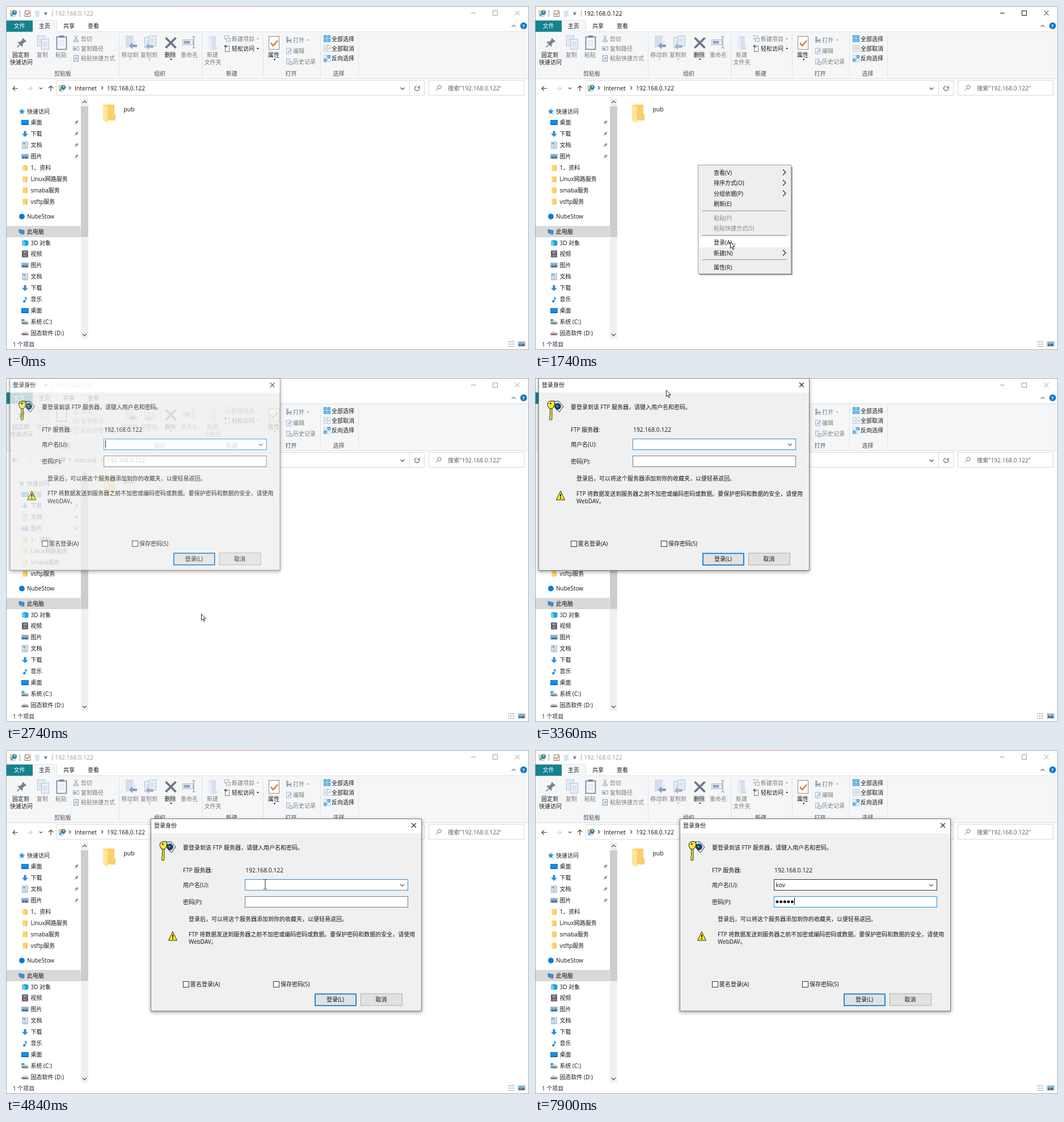
Write an HTML page that moves like this. It is 922 px wide and 607 px high and loops after 8000 ms.

```html
<!DOCTYPE html>
<html lang="zh-CN">
<head>
<meta charset="utf-8">
<title>FTP 登录</title>
<style>
html, body { margin: 0; width: 100%; height: 100%; overflow: hidden; background: #fff; }
svg { display: block; width: 100vw; height: 100vh; }
text { font-family: "Open Sans", "Noto Sans CJK SC", "Noto Sans CJK", "Noto Sans SC", sans-serif; white-space: pre; }
#dialog { filter: drop-shadow(0 2px 3px rgba(0,0,0,.4)); }
#ime { filter: drop-shadow(0 1px 2px rgba(0,0,0,.25)); }
</style>
</head>
<body>
<svg id="stage" viewBox="0 0 922 607" xmlns="http://www.w3.org/2000/svg"></svg>
<script>
const INK = '#161616', DIM = '#7d7d7d', BLUE = '#0a7ad6', GREY = '#9aa3ad';
const USER = 'kov';

// ---- drawing helpers: y of text is its visual middle ----
const text = (x, y, s, fill = INK, size = 10, more = '') =>
  `<text x="${x}" y="${y + 3.8}" font-size="${size}" fill="${fill}" ${more}>${s}</text>`;
const rect = (x, y, w, h, fill, stroke = 'none', sw = 1, more = '') =>
  `<rect x="${x}" y="${y}" width="${w}" height="${h}" fill="${fill}" stroke="${stroke}" stroke-width="${sw}" ${more}/>`;
const path = (d, fill = 'none', stroke = 'none', sw = 1, more = '') =>
  `<path d="${d}" fill="${fill}" stroke="${stroke}" stroke-width="${sw}" ${more}/>`;
const line = (d, stroke, sw = 1, more = '') => path(d, 'none', stroke, sw, more);
const disc = (x, y, r, fill, stroke = 'none', sw = 1) =>
  `<circle cx="${x}" cy="${y}" r="${r}" fill="${fill}" stroke="${stroke}" stroke-width="${sw}"/>`;
const at = (x, y, s, more = '') => `<g transform="translate(${x} ${y})${more}">${s}</g>`;
const group = (id, s) => `<g id="${id}">${s}</g>`;
const drop = (x, y, c) => path(`M${x - 2} ${y - 1}h4l-2 2.4z`, c);
const chevron = (x, y, dx, dy, c = '#444') =>
  line(dx ? `M${x} ${y - 3}l${dx} 3l${-dx} 3` : `M${x - 3.5} ${y}l3.5 ${dy}l3.5 ${-dy}`, c, 1.1);

// ---- icons, centred on 0,0 ----
const page = (w, h, fill, ink) =>
  rect(-w / 2, -h / 2, w, h, fill, ink) +
  [-.2, .05, .3].map(k => line(`M${-w * .3} ${h * k}h${w * .6}`, ink)).join('');
const pin = c => path('M-3-6H3V-4.5L2-4V-.5L4 1.5V2.5H-4V1.5L-2-.5V-4L-3-4.5Z', c) + line('M0 2V7.5', c, 1.2);
const drive = rect(-6, 0, 12, 4, '#777', 'none', 1, 'rx="1.5"') + path('M-6 1l2-3h8l2 3z', '#c9c9c9') + rect(2.5, 1.5, 2, 1, '#8fe08f');
const site = rect(-6, -4.5, 8, 6, '#f5d46c', '#c9ab55', .6) + rect(-5, 1, 8, 5, '#e6eaee', '#9ba5ad', .6) +
  disc(2, -1, 4.2, '#2d7fbd') + path('M0-3q2.5-2 4 .5l-1.5 2.5z', '#b5d98a') + path('M-5 2h4v3h-4z', '#4a8fcf');
const icons = {
  star: path('M0-5.5L1.5-1.8L5.5-1.5L2.4 1.1L3.4 5L0 2.9L-3.4 5L-2.4 1.1L-5.5-1.5L-1.5-1.8Z', '#2b93e0'),
  desk: rect(-6, -4, 12, 8, '#0f8ff0', '#0b62b0', .8) + line('M-5.6 3.5H5.6', '#0a4f90'),
  down: path('M-2-5h4v5h3.5l-5.5 5.5l-5.5-5.5h3.5z', '#2f8be0'),
  doc: page(9, 11, '#f3f7fa', '#7f97a8') + rect(-3, -4, 3, 2, '#3d8fcf'),
  pic: rect(-6, -4, 12, 8, '#eef3f6', '#8495a2', .8) + rect(-5, -3, 10, 3, '#5aa3dd') + path('M-5 3V0l4 1l6-1v3z', '#28506f'),
  dir: rect(-4, -5, 8, 10.5, '#ffd66e') + rect(2, -4, 2, 9, '#f2bd4a'),
  cloud: disc(0, 0, 5, BLUE),
  pc: path('M-5-4l9 2v6l-9-2z', '#2d93e3', '#53697a', .7) + line('M-3 4l7 1', '#89959e', 1.4),
  cube: path('M-5.5-3.5L0-5L6-3.5V4L0 5.5L-5.5 4Z', '#1ba0d8') + path('M-5.5-3.5L0-2V5.5L-5.5 4Z', '#67cdf2'),
  film: rect(-5.5, -6, 11, 12, '#3b4450') + rect(-3, -5, 6, 4.5, '#7b9dc4') + rect(-3, .5, 6, 4.5, '#b07a5c') +
    line('M-4.4-5v11M4.4-5v11', '#ddd', .9, 'stroke-dasharray="1.2 1.2"'),
  note: path('M0 3.5V-5Q1-3 3.5-2Q4 0 2.8 1.2Q3-.8 1.2-1.5V3.5', '#1c86dd') + disc(-1.3, 3.6, 2.2, '#1c86dd'),
  sys: rect(-6, -5, 5, 5, '#18a0e8') + drive,
  disk: drive
};

// ---- explorer window ----
const bigPage = (x, y) => rect(x, y, 13, 18, '#e6edf7', '#b4c3da') + line(`M${x + 3} ${y + 6}h7m-7 3h7m-7 3h7`, '#c3d0e2');
const tiles = (y, lit) => [0, 1, 2, 3].map(i => {
  const on = lit.includes(i);
  return rect(560.5 + i % 2 * 6.5, y - 5.5 + (i >> 1) * 6.5, 4.5, 4.5, on ? '#6fc4f5' : '#fff', on ? '#2e8fd0' : '#b3bcc5', .9);
}).join('');

function titleBar() {
  return at(13, 12.5, site) + line('M24.5 7v12', '#999') +
    rect(33.5, 8.5, 9, 10, '#fff', '#777') + line('M35 13l2.5 3l4-5', '#c8652a', 1.4) +
    rect(51, 8, 8, 11, '#d9e2ef') + line('M67.5 11.8h5', INK) + drop(70, 14.5, INK) + line('M81.5 7v12', '#aaa') +
    text(86, 12.7, '192.168.0.122', 'currentColor', 10.4) +
    line('M820 12.5h8M858.5 8.5h8v8h-8zM897.5 8.5l8 8m0-8l-8 8', 'currentColor');
}

function ribbon() {
  let s = rect(0, 46, 922, 82, '#f5f6f7') + line('M0 45.5H47M89 45.5H922M0 128.5H922', '#dcdddf') +
    rect(0, 25.5, 47, 20, '#17828f') + path('M47.5 46V25.5H89.5V46', '#f5f6f7', '#dfe0e2') +
    text(13.5, 35, '文件', '#fff') + text(58, 35, '主页') + text(101, 35, '共享') + text(144, 35, '查看') +
    chevron(895, 37, 0, -3.5, '#777') + disc(912.5, 35, 6, '#1277c8') + text(910, 35, '?', '#fff', 9, 'font-weight="700"');
  for (const x of [199.5, 345.5, 453.5, 554.5, 621.5]) s += line(`M${x} 49V126`, '#e1e2e4');
  const labels = [
    [119.5, '剪贴板 组织 新建 打开 选择', [85, 261, 388, 492.5, 576.5], '#4c4c4c'],
    [86.5, '固定到 删除 属性', [11, 279.5, 462], INK],
    [99.5, '快速访问', [7], INK],
    [86.5, '复制 粘贴 移动到 复制到 重命名 新建', [54, 87, 203.5, 237, 308, 354], DIM],
    [99.5, '文件夹', [349.5], DIM],
    [58, '剪切 新建项目', [132, 398], DIM],
    [75, '复制路径', [132], DIM],
    [92.5, '粘贴快捷方式', [132], DIM],
    [60, '打开', [506], DIM], [79, '编辑', [506], DIM], [98.5, '历史记录', [506], DIM],
    [75, '轻松访问 全部取消', [398, 574], INK],
    [58, '全部选择', [574], INK], [92.5, '反向选择', [574], INK]
  ];
  for (const [y, words, xs, c] of labels) words.split(' ').forEach((w, i) => s += text(xs[i], y, w, c));
  s += at(27, 65.5, pin('#78828c'), ' rotate(45) scale(1.4)');
  s += bigPage(55.5, 52.5) + bigPage(62.5, 58.5);
  s += rect(89.5, 54.5, 17, 22, '#f3f7fd', '#6d7f99', 1.6) + rect(94, 52, 8, 4, '#7c8aa0') + line('M93 61h10m-10 4h10m-10 4h10', '#c5d5ea');
  s += line('M120.5 52l5 8m1-8l-5 8', GREY, 1.2) + disc(121, 62, 1.8, 'none', GREY) + disc(126, 62, 1.8, 'none', GREY);
  s += rect(118.5, 72, 10, 6, '#eef2f7', '#8fa3bd') + line('M120 74l1 3l1-3l1 3l1-3', '#6d88a9', .8);
  s += rect(119.5, 87.5, 8, 10, '#eef2f7', '#8295ad') + line('M122 95l3-4m0 0h-2.5m2.5 0v2.5', '#5b82b5', .9);
  s += rect(211, 52, 14, 21, '#d4deee') + rect(222, 60, 6, 13, '#e3eaf5') + path('M217 70l6-6v4h8v4.5h-8v4z', '#8d9fbd');
  s += bigPage(244.5, 55.5) + bigPage(251.5, 52.5) + path('M246 71l6-6v4h8v4.5h-8v4z', '#a3b2cb');
  s += line('M281.5 56l18 18m0-18l-18 18', '#6a7688', 3.8);
  s += rect(311.5, 59.5, 18, 9, '#eef2f8', '#a9b7cb') + rect(313.5, 61.5, 11, 5, '#8da4c8') +
    line('M328 54h6m-3 0v20m-3 0h6', '#8b9ab0', 1.2);
  s += path('M357 53h13v18l2 1v5h-8l-7-4z', '#d5dfee') + path('M357 53l6 4v20l-6-4z', '#e5ecf6');
  s += rect(385.5, 52.5, 7, 6, '#f5f8fc', '#9fb0c6') + rect(388.5, 56.5, 7, 6, '#e6edf7', '#9fb0c6');
  s += rect(386.5, 70.5, 7, 10, '#fff', '#777') + line('M390 73l-5-2m0 0l3-2', '#333', 1.3);
  s += rect(463.5, 53.5, 18, 23, '#fff', '#8a8a8a') + line('M467 65l4 5l8-9', '#d97b2e', 2.6);
  s += rect(494, 54, 4, 11, '#aab7c8') + rect(500, 58, 4, 7, '#b9c8dc') + line('M496 61h6', '#7186a6', 1.5);
  s += rect(494.5, 74.5, 8, 10, '#f0f4fa', '#a6b7cd') + line('M497 82l6-6', '#8aa5cd', 1.6);
  s += rect(494.5, 93.5, 6, 9, '#e8edf4', '#a6b3c4') + disc(502, 101, 3, '#dfe6ef', '#8f9db0');
  s += tiles(57.5, [0, 1, 2, 3]) + tiles(75, []) + tiles(92.5, [1, 2]);
  for (const [x, y, c] of [[219, 94, '#aaa'], [252.5, 94, '#aaa'], [291, 94, INK], [473.5, 94.5, INK], [444, 58, '#999'], [444, 75, INK], [532.5, 60, '#999']])
    s += drop(x, y, c);
  return s;
}

function addressBar() {
  return line('M21 145.5H12m4-4l-4 4l4 4', '#444', 1.2) + line('M37 145.5h9m-4-4l4 4l-4 4', '#ccc', 1.2) +
    line('M59 144l2.5 2.5l2.5-2.5', '#555', 1.2) + line('M79 150v-9m-4 4l4-4l4 4', '#444', 1.2) +
    rect(89.5, 131.5, 648, 26, '#fff', '#d9d9d9') + line('M711.5 132v25', '#d9d9d9') +
    at(99, 144.5, site) + chevron(111, 144.5, 3, 0) + text(121, 144.7, 'Internet', INK, 10.4) +
    chevron(168, 144.5, 3, 0) + text(178, 144.7, '192.168.0.122', INK, 10.3) + chevron(699, 144, 0, 3.5) +
    line('M728.3 143.6A4.1 4.1 0 1 1 724.5 141.2M728.6 140.4v3.2h-3.2', '#555', 1.1) +
    rect(745.5, 131.5, 168, 26, '#fff', '#d9d9d9') + disc(764, 143, 3.2, 'none', '#777') +
    line('M761.7 145.3l-4 4', '#777') + text(779, 144.7, '搜索"192.168.0.122"', '#5f5f5f', 10.2);
}

function sidebar() {
  const rows = [
    ['star', '快速访问', 186, 0], ['desk', '桌面', 205.5, 2], ['down', '下载', 225.5, 2], ['doc', '文档', 245.5, 2],
    ['pic', '图片', 265.5, 2], ['dir', '1、资料', 285.5, 1], ['dir', 'Linux网路服务', 305.5, 1], ['dir', 'smaba服务', 325, 1],
    ['dir', 'vsftp服务', 345, 1], ['cloud', 'NubeStow', 371.5, 0], ['pc', '此电脑', 398, 0], ['cube', '3D 对象', 418, 1],
    ['film', '视频', 437.5, 1], ['pic', '图片', 457.5, 1], ['doc', '文档', 477.5, 1], ['down', '下载', 497.5, 1],
    ['note', '音乐', 517.5, 1], ['desk', '桌面', 537.5, 1], ['sys', '系统 (C:)', 557.5, 1], ['disk', '固态软件 (D:)', 577, 1]
  ];
  let s = rect(0, 388, 131.5, 20, '#d9d9d9');
  for (const [icon, name, y, level] of rows) {
    s += at(level ? 33.5 : 28, y, icons[icon]) + text(level ? 43.5 : 37, y, name);
    if (level === 2) s += at(124, y, pin('#858c94'), ' rotate(45) scale(.62)');
  }
  return s + rect(132, 163, 13, 424, '#f0f0f0') + rect(132, 177, 13, 230.5, '#cdcdcd') +
    chevron(138.5, 171, 0, -3.5) + chevron(138.5, 578.5, 0, 3.5);
}

function explorer() {
  return rect(0, 0, 922, 607, '#fff') + group('title', titleBar()) + ribbon() + addressBar() + sidebar() +
    path('M173 174H191V190l2 1.5V202H173Z', '#f8cf6b') + path('M171 173.5l8.5 3.5V207l-8.5-5z', '#ffe49a') +
    text(207.5, 182, 'pub', INK, 10.4) + text(12, 597, '1 个项目', '#223') +
    [592.5, 596.5, 600.5].map(y => line(`M885 ${y}h2m1 0h3.5m1 0h3.5`, '#8a8a8a')).join('') + at(909, 596.5, icons.pic) +
    rect(.5, .5, 921, 606, 'none', '#a8a8a8') +
    group('edge', line('M310 .5h70M392 .5h52', '#d98a84'));
}

// ---- context menu ----
const ITEMS = [['查看(V)', 294, 1], ['排序方式(O)', 312.5, 1], ['分组依据(P)', 331, 1], ['刷新(E)', 349.5],
  ['粘贴(P)', 374, 0, 1], ['粘贴快捷方式(S)', 392.5, 0, 1], ['登录(A)...', 417], ['新建(N)', 436, 1], ['属性(R)', 461]];

function menu() {
  return rect(290, 284, 164, 191, '#000', 'none', 1, 'opacity=".38"') + rect(287.5, 280.5, 164, 192, '#eee', '#a2a2a2') +
    rect(290, 0, 159, 18.5, '#fff', 'none', 1, 'id="hover"') +
    [361.5, 404.5, 447.5].map(y => line(`M295 ${y}H443`, '#919191')).join('') +
    ITEMS.map(([s, y, sub, off]) => text(315, y, s, off ? '#8b8b8b' : INK) +
      (sub ? line(`M437 ${y - 5.5}l5 5l-5 5`, '#222', 1.1) : '')).join('');
}

// ---- login dialog, local coordinates ----
const W = 478, H = 340;
function dialog() {
  const box = (x, s) => rect(x + .5, 287.5, 10, 10, '#fff', '#333') + text(x + 13, 292.3, s);
  const button = (x, s, main) =>
    (main ? rect(x + 1, 309.5, 72, 20.5, '#e1e1e1', '#0078d7', 1.7) : rect(x + .5, 309, 73, 21, '#e1e1e1', '#adadad')) +
    text(x + 36.5, 319.5, s, INK, 10, 'text-anchor="middle"');
  const key = path('M28 41h8l8 9l-7 10l-5-4z', '#e4e4e4', '#222', .9) + disc(34, 50, 5.2, '#123c8c', '#111', .9) +
    path('M30.5 49q3-5 5 0l-2 4z', '#2c9b4d') +
    path('M20 52h5l-1 3v18l-2 1.5l-3-2l1.5-2l-1.5-2l1.5-2v-10z', '#e9dc25', '#222', .9) +
    path('M17 43l4-2.5h6l2 4l-2 7l-4 3l-5-2l-2-5z', '#f4ea3a', '#222') + disc(21.5, 45, 1.4, '#222');
  return rect(.5, .5, W - 1, H - 1, '#f0f0f0', '#7b7b7b') + rect(1, 1, W - 2, 24.5, '#fff') +
    text(6, 12, '登录身份') + line('M460 8l8 8m0-8l-8 8', '#222', 1.1) + key +
    text(57, 51, '要登录到该 FTP 服务器，请键入用户名和密码。') +
    text(57, 91, 'FTP 服务器:') + text(167, 91, '192.168.0.122', INK, 10.3) +
    text(57, 117.5, '用户名(U):') + text(57, 147.5, '密码(P):') +
    rect(166.5, 107.5, 287, 19, '#fff', BLUE, 1, 'id="userBox"') + chevron(443.5, 116, 0, 3.2, '#555') +
    rect(166.5, 137.5, 287, 19, '#fff', '#7a7a7a', 1, 'id="passBox"') +
    `<text id="user" x="169.5" y="120.5" font-size="10.4" fill="${INK}"></text>` +
    group('dots', [0, 1, 2, 3, 4].map(i => disc(172 + 6.6 * i, 146.7, 2.5, '#111')).join('')) +
    rect(0, 0, 1, 13, '#000', 'none', 1, 'id="caret"') +
    text(67, 177, '登录后，可以将这个服务器添加到你的收藏夹，以便轻易返回。') +
    path('M39 199.5L46.5 215H31.5Z', '#ffee1a', '#222', 1, 'stroke-linejoin="round"') + line('M39 204.5v5m0 1.5v2', '#000', 1.8) +
    text(67, 203.7, 'FTP 将数据发送到服务器之前不加密或编码密码或数据。要保护密码和数据的安全，请使用') +
    text(67, 217, 'WebDAV。') + box(57, '匿名登录(A)') + box(216, '保存密码(S)') + button(289, '登录(L)', true) + button(370, '取消');
}

const ime = () => rect(426.5, 257.5, 294, 84, '#fff', '#d0d3d6') + line('M434 297.5H713', '#e4e6e8') +
  ['typed', 'picks'].map((id, i) => `<text id="${id}" x="437" y="${i ? 324 : 283}" font-size="13" fill="#333"></text>`).join('');

const arrow = path('M.4.4V11.5L3 9.2L4.9 13.5L6.7 12.7L4.8 8.5H8.3Z', '#fff', '#111', .9);
const beam = line('M-3-8.5h2l1 1l1-1h2M0-7.5v15M-3 8.5h2l1-1l1 1h2', '#222');
const busy = disc(0, 0, 5.5, 'none', '#1583d8', 3) + line('M0-5.5A5.5 5.5 0 0 1 5.5 0', '#7cc6f5', 2.4, 'id="spin"');

document.getElementById('stage').innerHTML = explorer() + group('menu', menu()) +
  group('linger', text(315, 417, '登录(A)...', '#333')) + group('dialog', dialog()) + group('ime', ime()) +
  group('cursor', group('press', disc(0, 0, 10, '#f7e03c')) + group('arrow', arrow) + group('beam', beam) + group('busy', busy));

// ---- motion ----
const el = id => document.getElementById(id);
const set = (id, name, v) => el(id).setAttribute(name, v);
const show = (id, v) => set(id, 'opacity', +v);
const clamp = v => Math.max(0, Math.min(1, v));
const ramp = (t, a, b) => clamp((t - a) / (b - a));
const ease = u => u * u * (3 - 2 * u);
const within = (t, a, b) => t >= a && t < b;

// start, end, x, y reached at the end, extra time for y
const GRAB = [231, 21], DRAG = 3400, RELEASE = 3800;
const MOVES = [[340, 480, 287, 281], [730, 731, 287, 280], [1290, 1720, 344, 416], [2880, 3360, ...GRAB],
  [DRAG, 3719, 480, 142, 8], [3830, 4110, 457, 237]];
function pointer(t) {
  let x = 530, y = 383;
  for (const [a, b, nx, ny, lag = 0] of MOVES) {
    x += (nx - x) * ease(ramp(t, a, b));
    y += (ny - y) * ease(ramp(t, a, b + lag));
  }
  return [x, y];
}

const IME_STEPS = [[5040, 1, '1.看  2.可  3.快  4.开  5.考'], [5410, 2, '1.口  2.扣  3.空  4.控  5.孔'], [5550, 3, `1.${USER}  2.口  3.扣  4.空`]];
const DOT_TIMES = [6980, 7230, 7610, 7720, 7900];
const CARET_ON = [[2600, 3230], [3760, 4840], [5410, 6600], [6680, 8000]];

function draw(t) {
  const active = within(t, 910, 2500);
  set('title', 'color', active ? '#111' : '#9b9b9b');
  show('edge', !active);

  const [x, y] = pointer(t);
  show('menu', ramp(t, 880, 1120) * (1 - ramp(t, 2080, 2270)));
  const row = ITEMS.find(i => Math.abs(i[1] - y) < 9.3);
  show('hover', t > 1290 && row ? 1 : 0);
  if (row) set('hover', 'y', row[1] - 9.5);
  show('linger', within(t, 2080, 2500) ? 1 - ramp(t, 2360, 2500) : 0);

  // the dialog follows the hand that drags it
  const fade = ramp(t, 2530, 2790);
  const k = .95 + .05 * (1 - (1 - fade) ** 2);
  const [hx, hy] = t < DRAG ? GRAB : pointer(Math.min(t, RELEASE));
  show('dialog', fade);
  set('dialog', 'transform', `translate(${6 + hx - GRAB[0] + W * (1 - k) / 2} ${hy - GRAB[1] + H * (1 - k) / 2}) scale(${k})`);

  const onPass = t >= 6650, typed = t >= 5880;
  set('userBox', 'stroke', onPass ? '#333' : '#2b8fe0');
  set('passBox', 'stroke', onPass ? '#2b8fe0' : '#7a7a7a');
  el('user').textContent = typed ? USER : '';
  const count = DOT_TIMES.filter(d => t >= d).length;
  [...el('dots').children].forEach((d, i) => d.setAttribute('opacity', +(i < count)));
  set('caret', 'x', onPass ? 169 + 6.6 * count : typed ? 186.5 : 169);
  set('caret', 'y', onPass ? 139.5 : 109.5);
  show('caret', CARET_ON.some(([a, b]) => within(t, a, b)));

  const step = IME_STEPS.filter(s => t >= s[0]).pop();
  show('ime', step ? 1 - ramp(t, 5850, 6000) : 0);
  if (step) {
    el('typed').textContent = USER.slice(0, step[1]);
    el('picks').textContent = step[2];
  }

  const waiting = within(t, 2080, 2540);
  set('cursor', 'transform', `translate(${x} ${y})`);
  show('busy', waiting);
  set('spin', 'transform', `rotate(${t * .36 % 360})`);
  show('arrow', within(t, 340, 4050) && !waiting);
  show('beam', within(t, 4050, 5860) || within(t, 6680, 6980));
  show('press', within(t, 1860, 2010) || within(t, DRAG, RELEASE) || within(t, 4350, 4480) ? .8 : 0);
}

function loop() {
  draw(performance.now() % 8000);
  requestAnimationFrame(loop);
}
loop();
</script>
</body>
</html>
```
